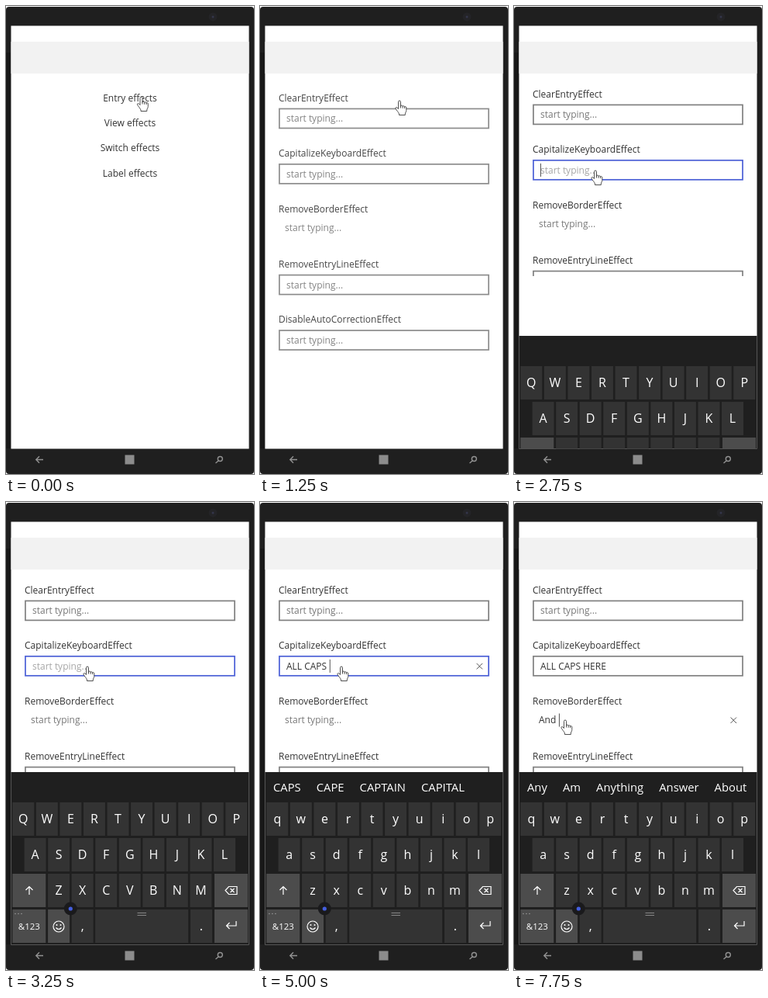
These frames come from a looping animation (320 px wide and 603 px high, 8000 ms). An HTML page:

```html
<!DOCTYPE html>
<html lang="en">
<head>
<meta charset="utf-8">
<title>Entry effects</title>
<style>
html, body { margin: 0; width: 100%; height: 100%; overflow: hidden; background: #fff; }
svg { display: block; width: 320px; height: 603px; font-family: "Open Sans", "Noto Sans", sans-serif; font-size: 12px; }
#board { font-weight: 500; }
</style>
</head>
<body>
<svg id="stage" viewBox="0 0 320 603" xmlns="http://www.w3.org/2000/svg">
  <defs>
    <clipPath id="screenClip"><rect x="6.5" y="25.5" width="307" height="545"/></clipPath>
    <clipPath id="pageClip"><rect id="pageArea" x="6.5" y="87" width="307" height="483.5"/></clipPath>
    <clipPath id="wordClip"><rect x="8" y="348" width="304" height="38"/></clipPath>
  </defs>
  <rect y="1" width="320" height="602" rx="4" fill="#1f1f1f"/>
  <rect y="60" width="6" height="510" fill="#181818"/>
  <circle cx="267" cy="14" r="5.5" fill="#242427"/>
  <circle cx="267" cy="14" r="1.5" fill="#34364a"/>
  <rect x="6.5" y="25.5" width="307" height="545" fill="#fff"/>
  <rect x="6.5" y="46" width="307" height="41" fill="#f2f2f2"/>
  <g id="menu" fill="#333" text-anchor="middle"></g>
  <g clip-path="url(#pageClip)"><g id="page"></g></g>
  <g clip-path="url(#screenClip)"><g id="board"></g></g>
  <g fill="none" stroke="#929292" stroke-width="1.4">
    <path d="M48 584.5H39M43 580.3L38.8 584.5L43 588.7"/>
    <circle cx="276.3" cy="583.5" r="3"/>
    <path d="M274 586L270.5 589"/>
  </g>
  <rect x="153.5" y="578.5" width="12" height="12" fill="#8c8c8c"/>
  <path id="hand" fill="#fff" stroke="#333" stroke-width="0.85" stroke-linejoin="round"
    d="M-1.5 1.5a1.5 1.5 0 0 1 3 0V7.2c0-1.5 2.6-1.5 2.6.3c0-1.2 2.5-1 2.5.6c0-1 2.2-.8 2.2.9V12.5c0 2-1.5 3-1.5 4.5V18.5H-.5V17C-1 15-4.5 11.8-5 10c-.4-1.4 1.2-2 2-1L-1.5 10.5ZM1.5 7v2.5M4.1 7.5v2.3M6.6 8v2"/>
</svg>
<script>
const LOOP = 8000;
const $ = id => document.getElementById(id);
const clamp = v => Math.max(0, Math.min(1, v));

function add(parent, tag, attrs, text) {
  const el = document.createElementNS('http://www.w3.org/2000/svg', tag);
  for (const k in attrs) el.setAttribute(k, attrs[k]);
  if (text !== undefined) el.textContent = text;
  parent.appendChild(el);
  return el;
}
const set = (el, name, value) => el.setAttribute(name, value);
const show = (el, on) => set(el, 'visibility', on ? 'visible' : 'hidden');

// Menu
['Entry', 'View', 'Switch', 'Label'].forEach((name, i) =>
  add($('menu'), 'text', { x: 160, y: 122.5 + i * 32.4 }, name + ' effects'));

// Form
const names = ['ClearEntry', 'CapitalizeKeyboard', 'RemoveBorder', 'RemoveEntryLine', 'DisableAutoCorrection'];
const fields = names.map((name, i) => {
  const y = i * 71.4, bare = i === 2;
  const x = bare ? 32 : 34, mid = bare ? 281 : 140 + y;
  add($('page'), 'text', { x: 24, y: 117.8 + y, fill: '#333' }, name + 'Effect');
  const box = add($('page'), 'rect', { x: 25, y: 127.4 + y, width: 270, height: 25, fill: 'none', 'stroke-width': 1.7 });
  if (bare) show(box, false);
  const text = add($('page'), 'text', { x, y: mid + 4.3 });
  const caret = add($('page'), 'rect', { y: mid - 8.5, width: 1, height: 17, fill: '#555' });
  const clear = add($('page'), 'path', { d: `M279.5 ${mid - 3.5}l7.5 7.5m0-7.5l-7.5 7.5`, stroke: '#555', 'stroke-width': 1 });
  return { x, box, text, caret, clear };
});

// Keyboard
const board = $('board');
const letters = [];
const STEP = 30.55;
function key(x, y, w, label, opts = {}) {
  add(board, 'rect', { x, y, width: w, height: 43, fill: opts.fill || '#333' });
  if (!label) return;
  return add(board, 'text', { x: x + w / 2, y: y + (opts.drop || 27), 'font-size': opts.size || 16, fill: '#fff', 'text-anchor': 'middle' }, label);
}
add(board, 'rect', { x: 6, y: 348, width: 308, height: 223, fill: '#1f1f1f' });
[['qwertyuiop', 8.3, 387], ['asdfghjkl', 23.6, 433], ['zxcvbnm', 54.1, 479]].forEach(([row, x, y]) =>
  [...row].forEach((c, i) => letters.push({ c, el: key(x + i * STEP, y, 28, c) })));
const dark = { fill: '#4c4c4c' };
key(8.3, 479, 43, '', dark);
key(269, 479, 43, '', dark);
key(8.3, 525, 43, '&123', { fill: '#4c4c4c', size: 11.5, drop: 26 });
key(54.1, 525, 28, '', dark);
key(84.7, 525, 28, ',');
key(115.2, 525, 120, '');
key(238, 525, 28, '.');
key(269, 525, 43, '', dark);
const line = { fill: 'none', stroke: '#fff', 'stroke-width': 1.2 };
const icon = d => add(board, 'path', { ...line, d });
icon('M30 506V495.5M25.5 500L30 495.5L34.5 500');
icon('M283 500.5L287.5 495.5H298V505.5H287.5ZM289.5 498l5 5m0-5l-5 5');
icon('M297 540V546H284.5M288.5 542L284.5 546L288.5 550');
icon('M64.5 548.5Q68 552.5 71.5 548.5');
add(board, 'circle', { ...line, cx: 68, cy: 547, r: 7 });
[65.5, 70.5].forEach(cx => add(board, 'circle', { cx, cy: 545, r: 1, fill: '#fff' }));
[12, 16, 20].forEach(cx => add(board, 'circle', { cx, cy: 530.5, r: 0.7, fill: '#aaa' }));
add(board, 'path', { d: 'M169.5 529.5h11.5M169.5 532.5h11.5', stroke: '#888' });
add(board, 'circle', { cx: 83.3, cy: 524, r: 8.5, fill: '#1a1a1c' });
add(board, 'circle', { cx: 83.3, cy: 524, r: 2.6, fill: '#445fe0' });
const strip = add(add(board, 'g', { 'clip-path': 'url(#wordClip)' }), 'text',
  { x: 17, y: 372.8, 'font-size': 14.8, fill: '#fff' });

const hints = [
  [0, ''],
  [3500, 'AND AM ARE AT ALL ABOUT'],
  [3860, 'ALMOST ALVEK ALLAH ALTHUNI ALSO'],
  [4220, 'CAN COULD CALL COME CAR'],
  [4580, 'CAPS CAPE CAPTAIN CAPITAL'],
  [5120, 'HE HAVE HER HIS HOW HAD'],
  [5660, "HER HERE'S NEED GREEN FERTIM"],
  [6450, ''],
  [7050, 'And Are At All About'],
  [7650, 'Any Am Anything Answer About']
];
let shown = '';
function suggest(t) {
  const words = hints.filter(h => h[0] <= t).pop()[1];
  if (words === shown) return;
  shown = words;
  strip.textContent = '';
  if (words) words.split(' ').forEach((w, i) => add(strip, 'tspan', { dx: i ? 20 : 0 }, w));
}

// Typed text: first key time, gap between keys, focus span
const entries = {
  1: { text: 'ALL CAPS HERE', start: 3500, gap: 180, from: 2450, to: 6450 },
  2: { text: 'And ', start: 7050, gap: 200, from: 6450, to: LOOP }
};

function drawField(i, t) {
  const f = fields[i], e = entries[i];
  const focus = !!e && t >= e.from && t < e.to;
  const n = e && t >= e.start ? Math.min(e.text.length, Math.floor((t - e.start) / e.gap) + 1) : 0;
  const hover = i === 1 && t >= 2100 && t < e.from;
  f.text.textContent = n ? e.text.slice(0, n).replace(/ /g, '\u00a0') : 'start typing...';
  set(f.text, 'fill', n ? '#333' : focus ? '#a6a6a6' : '#777');
  set(f.box, 'stroke', focus ? '#4a5fd6' : hover ? '#1f1f1f' : '#808080');
  const last = n ? e.start + (n - 1) * e.gap : e ? e.from : 0;
  show(f.caret, focus && (t - last) % 1060 < 530);
  set(f.caret, 'x', f.x + (n ? f.text.getComputedTextLength() + 0.5 : 0));
  show(f.clear, focus && n > 0);
  return focus && !n;
}

// Pointer stops: time, x, y
const path = [
  [0, 174.5, 117], [200, 174.5, 117], [550, 178, 82], [900, 176, 112], [1250, 180, 122],
  [1450, 176, 128], [2150, 105, 212], [5700, 105, 212], [6200, 66, 277],
  [6450, 66, 277], [6700, 66, 281], [LOOP, 66, 281]
];
function pointer(t) {
  const k = path.findIndex(p => p[0] > t);
  const [t0, x0, y0] = path[k - 1], [t1, x1, y1] = path[k];
  const p = (t - t0) / (t1 - t0), s = p * p * (3 - 2 * p);
  return `translate(${x0 + (x1 - x0) * s} ${y0 + (y1 - y0) * s})`;
}

function draw(t) {
  const enter = clamp((t - 1080) / 380);
  show($('menu'), t < 1080);
  set($('page'), 'opacity', clamp(enter * 2));
  set($('page'), 'transform', `translate(0 ${55 * (1 - enter) ** 4})`);

  const rise = clamp((t - 2483) / 650);
  show(board, rise > 0);
  set(board, 'transform', `translate(0 ${223 * (1 - rise) ** 2})`);
  set($('pageArea'), 'height', rise > 0 ? 261 : 483.5);

  const upper = fields.map((f, i) => drawField(i, t)).some(Boolean);
  letters.forEach(({ c, el }) => { el.textContent = upper ? c.toUpperCase() : c; });
  suggest(t);
  set($('hand'), 'transform', pointer(t));
}

const began = performance.now();
function tick() {
  draw((performance.now() - began) % LOOP);
  requestAnimationFrame(tick);
}
tick();
</script>
</body>
</html>
```
